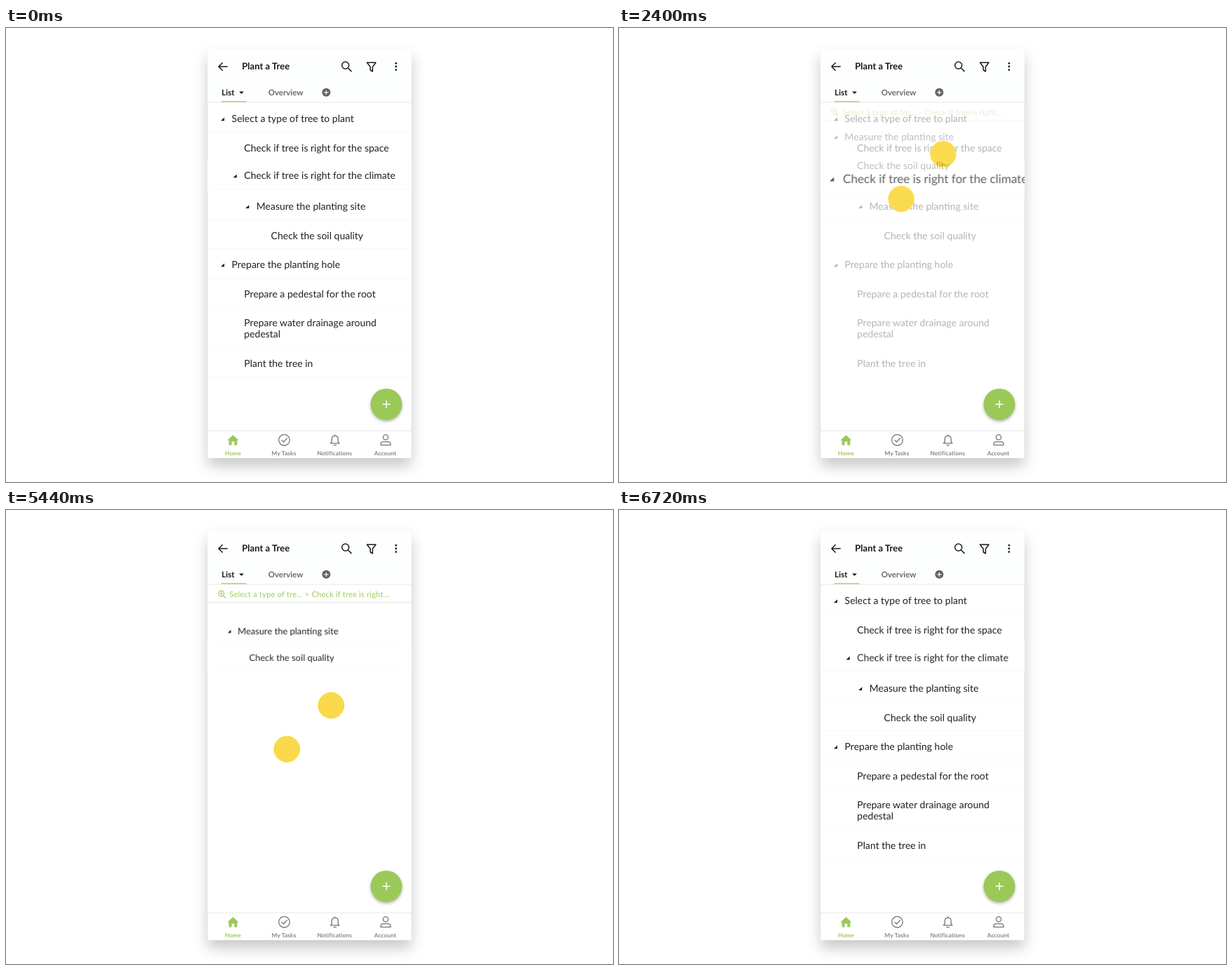
An HTML page for the animation above (7.84 s loop, 865 by 647 pixels).

```html
<!DOCTYPE html>
<html lang="en">
<head>
<meta charset="utf-8">
<title>Plant a Tree</title>
<style>
html, body { margin: 0; width: 100%; height: 100%; overflow: hidden; background: #fff; }
svg { display: block; width: 100%; height: 100%; }
text { font-family: Lato, "Open Sans", sans-serif; text-rendering: geometricPrecision; }
.row text { font-size: 14px; fill: #212121; }
.row path { fill: #151515; }
.rule { stroke: #f8f8f8; stroke-width: 1; }
.edge { stroke: #e8e8e8; stroke-width: 1.2; }
.line { fill: none; stroke: #1c1c1c; stroke-width: 1.5; stroke-linecap: round; stroke-linejoin: round; }
.grey { stroke: #757575; stroke-width: 1.3; }
.green { stroke: #9bc957; stroke-width: 1.1; }
.bold { font-weight: 700; fill: #1a1a1a; }
.tab { font-size: 11.5px; }
.nav text { font-size: 8.3px; font-weight: 700; letter-spacing: .15px; text-anchor: middle; fill: #858585; }
.crumb { font-size: 11px; letter-spacing: .24px; fill: #9bc957; }
.touch { fill: #f8cd0b; stroke: #f8d000; stroke-width: 1; }
#phone { filter: drop-shadow(0 11px 10px rgba(0, 0, 0, .22)); }
#fab { filter: drop-shadow(0 2px 2px rgba(0, 0, 0, .3)); }
#focus { transform-origin: 431px 190px; }
#sub { transform-origin: 432px 381px; }
</style>
</head>
<body>
<svg viewBox="0 0 865 647">
  <defs>
    <clipPath id="body"><rect x="287.5" y="106.6" width="290" height="467"/></clipPath>
  </defs>
  <rect id="phone" x="287.5" y="30" width="290" height="583" fill="#fff"/>
  <rect x="287.5" y="30" width="290" height="76" fill="#fdfefe"/>

  <g clip-path="url(#body)">
    <g id="rest"></g>
    <g id="focus"><rect x="270" y="190" width="325" height="40" fill="#fff"/></g>
    <g id="spread"></g>
    <g id="zoomed">
      <rect x="270" y="100" width="325" height="480" fill="#fff"/>
      <g id="sub"></g>
      <circle class="line green" cx="306.7" cy="119" r="3.9"/>
      <path class="line green" d="M309.6 122L313 125.4M304.9 119h3.6M306.7 117.2v3.6"/>
      <text class="crumb" x="318.5" y="124">Select a type of tre... &gt; Check if tree is right...</text>
      <path class="edge" d="M287.5 131.6H577.5"/>
      <g id="pinch"></g>
    </g>
  </g>

  <path class="line" d="M315.3 55H303M308.3 49.8L303 55L308.3 60.2"/>
  <text class="bold" x="336.2" y="59.3" font-size="13.1">Plant a Tree</text>
  <circle class="line" cx="483.7" cy="53.3" r="5"/>
  <path class="line" d="M487.4 57L492 61.6"/>
  <path class="line" d="M514.5 49.2H527L522.4 55.5V62L519.2 60V55.5Z"/>
  <g fill="#1c1c1c">
    <circle cx="555.8" cy="50.3" r="1.4"/><circle cx="555.8" cy="55" r="1.4"/><circle cx="555.8" cy="59.7" r="1.4"/>
    <path d="M332.3 90.5H338.9L335.6 94Z"/>
  </g>
  <text class="bold tab" x="307.3" y="95.6">List</text>
  <text class="bold tab" x="373.7" y="95.6" style="fill:#6b6b6b">Overview</text>
  <circle cx="456.4" cy="91.8" r="6" fill="#626262"/>
  <path class="line" d="M453.6 91.8h5.6M456.4 89v5.6" style="stroke:#fff;stroke-width:1.2"/>
  <path class="edge" d="M287.5 106H577.5"/>
  <path d="M307 104.9H342.5" stroke="#9bc957" stroke-width="1.2"/>

  <g id="fab">
    <circle cx="542" cy="536.3" r="22.4" fill="#9bc957"/>
  </g>
  <path class="line" d="M537 536.2h10M542 531.2v10" style="stroke:#fff"/>

  <path class="edge" d="M287.5 574H577.5"/>
  <g class="nav">
    <path d="M323.5 580L331.6 587.5H329.4V594.5H325.4V589.5H321.6V594.5H317.6V587.5H315.4Z" fill="#9bc957"/>
    <circle class="line grey" cx="396.5" cy="587.2" r="7.8"/>
    <path class="line grey" d="M393 587.4l2.6 2.6l4.8-5.2"/>
    <path class="line grey" d="M462.5 591.8H475L473.2 589.5V586C473.2 582.8 471.4 581.2 468.7 581.2S464.3 582.8 464.3 586V589.5ZM468.7 581V579.8M467.2 594.3Q468.7 595.4 470.2 594.3"/>
    <circle class="line grey" cx="541" cy="583.3" r="3.6"/>
    <path class="line grey" d="M534 594.4V593C534 590.7 535.8 589.6 538 589.6H544C546.2 589.6 548 590.7 548 593V594.4Z"/>
    <text x="323.5" y="609.2" style="fill:#9bc957">Home</text>
    <text x="396" y="609.2">My Tasks</text>
    <text x="468.2" y="609.2">Notifications</text>
    <text x="540.5" y="609.2">Account</text>
  </g>
</svg>
<script>
const LOOP = 7840;
const byId = id => document.getElementById(id);

function add(parent, tag, attrs, text) {
  const el = document.createElementNS("http://www.w3.org/2000/svg", tag);
  for (const k in attrs) el.setAttribute(k, attrs[k]);
  if (text) el.textContent = text;
  return parent.appendChild(el);
}

// x and y give the text baseline; open rows carry a corner marker
function row(parent, x, y, lines, ruleY, open) {
  const g = add(parent, "g", { class: "row" });
  lines.split("|").forEach((s, i) => add(g, "text", { x, y: y + i * 16 }, s));
  if (open) add(g, "path", { d: `M${x - 15.5} ${y - 2}h5v-4.8z` });
  if (ruleY) add(parent, "path", { class: "rule", d: `M287.5 ${ruleY}H577.5` });
}

const rest = byId("rest"), focus = byId("focus"), sub = byId("sub");
row(rest, 321.6, 134.2, "Select a type of tree to plant", 148, true);
row(rest, 339.3, 175.5, "Check if tree is right for the space", 0);
row(focus, 339.3, 215.3, "Check if tree is right for the climate", 229.5, true);
row(rest, 356.8, 259, "Measure the planting site", 273, true);
row(rest, 377.6, 300.5, "Check the soil quality", 314.6);
row(rest, 321.6, 342.2, "Prepare the planting hole", 356.2, true);
row(rest, 339.3, 383.8, "Prepare a pedestal for the root", 397.8);
row(rest, 339.3, 425.3, "Prepare water drainage around|pedestal", 455.2);
row(rest, 339.3, 482.8, "Plant the tree in", 497);
row(sub, 321.6, 159.8, "Measure the planting site", 174, true);
row(sub, 339.3, 201.3, "Check the soil quality", 215.3);

// steps: [ms, value, easing towards the next step]
function play(el, prop, steps) {
  const last = steps[steps.length - 1];
  const all = [...steps, [LOOP, last[1]]];
  if (steps[0][0]) all.unshift([0, steps[0][1]]);
  el.animate(
    all.map(([ms, v, easing = "linear"]) => ({ offset: ms / LOOP, [prop]: v, easing })),
    { duration: LOOP, iterations: Infinity }
  );
}

// hold a, ease to b between t0 and t1, then snap back at reset
const swing = (a, b, [t0, t1, reset]) =>
  [[t0, a, "ease-in-out"], [t1, b], [reset, b], [reset, a]];

const SPREAD = [1220, 1690, 3200];
const PINCH = [5120, 5790, 7000];

function touches(parent, show, shown, move, paths) {
  const reset = move[2];
  play(parent, "opacity", [[show, 0], [shown, 1], [reset, 1], [reset, 0]]);
  for (const [x, y, dx, dy] of paths) {
    const c = add(parent, "circle", { class: "touch", cx: x, cy: y, r: 18.2 });
    play(c, "transform", swing("translate(0px, 0px)", `translate(${dx}px, ${dy}px)`, move));
    play(c, "fillOpacity", swing(.5, 1, move));
  }
}

touches(byId("spread"), 600, 780, SPREAD,
  [[448.9, 197.4, 13, -17.9], [414.7, 229.2, -12.5, 14.3]]);
touches(byId("pinch"), 4620, 4740, PINCH,
  [[470.2, 265.3, -14.9, 28.4], [388.4, 349.4, 25.5, -18.5]]);

play(rest, "opacity", swing(1, .47, SPREAD));
play(focus, "transform", swing("scale(1)", "scale(1.22)", SPREAD));
play(sub, "transform", swing("scale(1)", "scale(.832)", PINCH));
play(byId("zoomed"), "opacity",
  [[2300, 0, "ease-out"], [2840, 1], [6380, 1, "ease-out"], [6720, 0]]);
</script>
</body>
</html>
```
